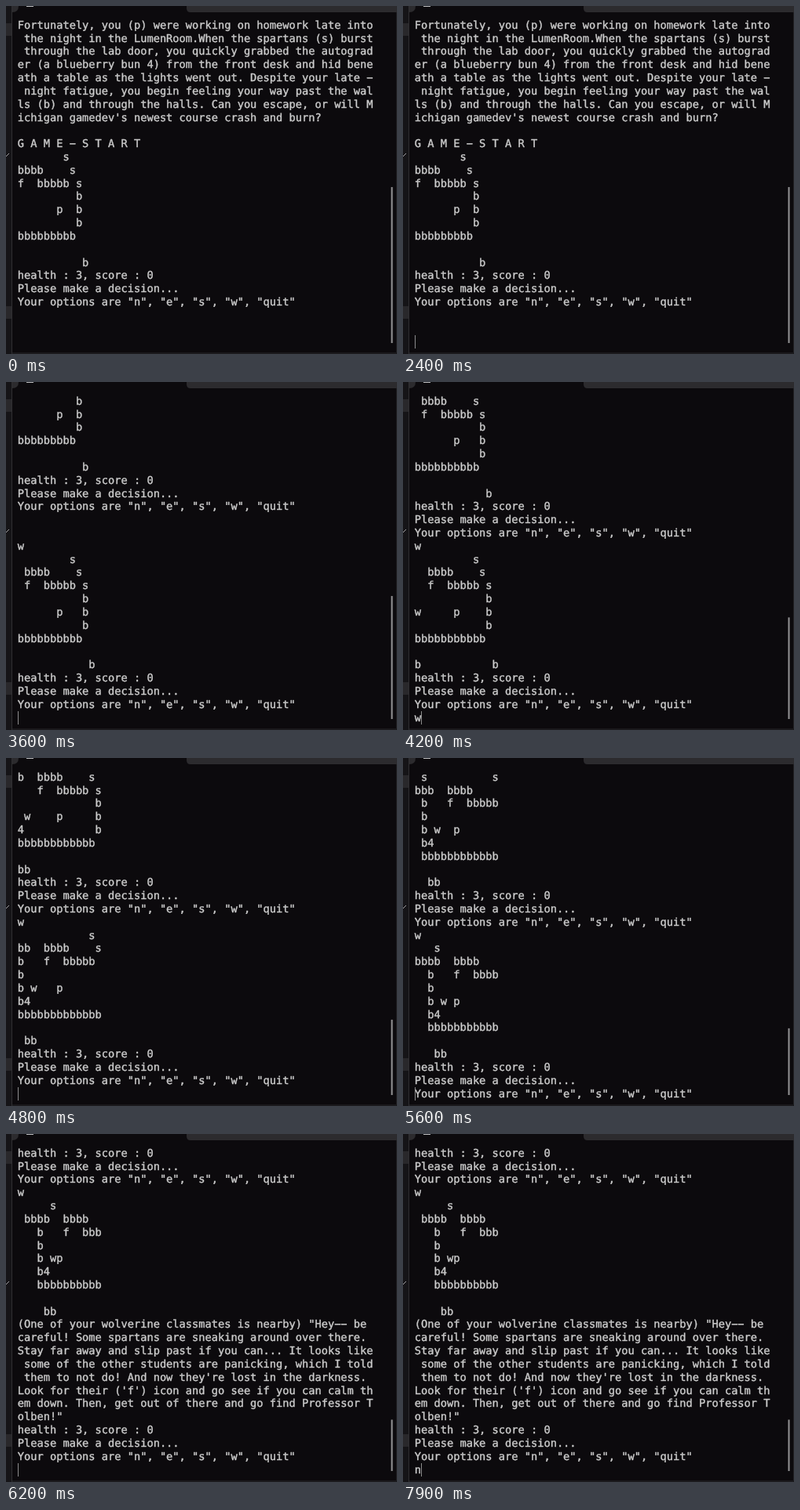
Recreate the animation shown at these times as an HTML page with a canvas. Size 498 px wide and 444 px high, loop 8000 ms.

```html
<!DOCTYPE html>
<html lang="en">
<head>
<meta charset="utf-8">
<title>Terminal maze game</title>
<style>
  html, body { margin: 0; width: 100%; height: 100%; overflow: hidden; background: #0c0a0d; }
  canvas { display: block; }
</style>
</head>
<body>
<canvas id="stage" width="498" height="444"></canvas>
<script>
const ctx = document.getElementById('stage').getContext('2d');
const LOOP = 8000;
const ROWS = 25;
const LEFT = 14.8, BASE = 28.7, LINE = 16.83, CELL = 8.236;

const intro = [
  'Fortunately, you (p) were working on homework late into',
  ' the night in the LumenRoom.When the spartans (s) burst',
  ' through the lab door, you quickly grabbed the autograd',
  'er (a blueberry bun 4) from the front desk and hid bene',
  'ath a table as the lights went out. Despite your late \u2212',
  ' night fatigue, you begin feeling your way past the wal',
  'ls (b) and through the halls. Can you escape, or will M',
  "ichigan gamedev's newest course crash and burn?",
  '',
  'G A M E \u2212 S T A R T'
];
const talk = [
  '(One of your wolverine classmates is nearby) "Hey\u2212\u2212 be',
  'careful! Some spartans are sneaking around over there.',
  'Stay far away and slip past if you can... It looks like',
  ' some of the other students are panicking, which I told',
  " them to not do! And now they're lost in the darkness.",
  "Look for their ('f') icon and go see if you can calm th",
  'em down. Then, get out of there and go find Professor T',
  'olben!"'
];
const status = [
  'health : 3, score : 0',
  'Please make a decision...',
  'Your options are "n", "e", "s", "w", "quit"'
];
const world = [
  '              s',
  ' bbbb  bbbb    s',
  '   b   f  bbbbb s',
  '   b            b',
  '   b w          b',
  '   b4           b',
  '   bbbbbbbbbbbbb',
  '',
  '    bb           b'
];
const VIEW = 13, LAST = 7, PLAYER = 6;

function put(row, col, ch) {
  return row.slice(0, col).padEnd(col) + ch + row.slice(col + 1);
}

// The view slides one column west per turn; one guard walks east.
function mapAt(turn) {
  const from = LAST - turn;
  return world.map((row, i) => {
    let line = row;
    if (i === 0 && turn > 3) line = put(line, turn - 2, 's');
    line = line.slice(from, from + VIEW);
    return i === 4 ? put(line, PLAYER, 'p') : line;
  });
}

const pages = [[...intro, ...mapAt(0), ...status, '', '']];
for (let turn = 1; turn <= LAST; turn++) {
  pages.push([...pages[turn - 1], 'w', ...mapAt(turn),
    ...(turn === LAST ? talk : []), ...status]);
}

// [start, turn, typed, cursor on, output still printing]
const steps = [
  [0, 0, '', 0], [1400, 0, '', 1], [1900, 0, '', 0], [2400, 0, '', 1], [2900, 0, '', 0],
  [3400, 0, 'w', 1], [3600, 1, '', 1],
  [3800, 1, 'w', 1], [4000, 2, '', 1],
  [4200, 2, 'w', 1], [4400, 3, '', 1],
  [4500, 3, 'w', 1], [4800, 4, '', 1],
  [5000, 4, 'w', 1], [5200, 5, '', 1],
  [5500, 5, 'w', 1], [5600, 6, '', 1, true], [5700, 6, '', 1],
  [6100, 6, 'w', 1], [6200, 7, '', 1],
  [6900, 7, '', 0], [7400, 7, '', 1], [7900, 7, 'n', 1]
];

function box(color, x, y, w, h) {
  ctx.fillStyle = color;
  ctx.fillRect(x, y, w, h);
}

function drawFrame() {
  box('#0c0a0d', 0, 0, 498, 444);
  // Window behind, on the left
  box('#151417', 0, 0, 7, 444);
  box('#29282b', 0, 22, 7, 16);
  box('#29282b', 0, 383, 7, 16);
  box('#302f32', 7, 0, 1, 444);
  ctx.strokeStyle = '#a5a5a7';
  ctx.lineWidth = 1;
  ctx.beginPath();
  ctx.moveTo(0, 192);
  ctx.lineTo(4, 188);
  ctx.stroke();
  // Tab bar
  ctx.fillStyle = '#2c2b2e';
  ctx.beginPath();
  ctx.moveTo(230, 0);
  ctx.lineTo(498, 0);
  ctx.lineTo(498, 8);
  ctx.lineTo(235, 8);
  ctx.quadraticCurveTo(230, 8, 230, 3);
  ctx.fill();
  ctx.beginPath();
  ctx.moveTo(8, 0);
  ctx.lineTo(16, 0);
  ctx.quadraticCurveTo(16, 8, 8, 8);
  ctx.fill();
  box('#bdbdbf', 26, 0, 9, 1);
  box('#232225', 497, 8, 1, 436);
  box('#1b1a1d', 8, 442, 490, 2);
}

function drawScrollbar(turn) {
  const total = 48.6 + pages[turn].length - pages[0].length;
  const h = 9670 / total;
  box('#949395', 490.5, 430 - h, 2, h);
}

function drawText(lines) {
  ctx.font = '13.68px "DejaVu Sans Mono", monospace';
  ctx.textRendering = 'geometricPrecision';
  ctx.fillStyle = ctx.strokeStyle = '#cccccc';
  ctx.lineWidth = 0.4;
  ctx.lineJoin = 'round';
  lines.forEach((line, i) => {
    const y = BASE + i * LINE;
    ctx.fillText(line, LEFT, y);
    ctx.strokeText(line, LEFT, y);
  });
}

function draw(time) {
  const [, turn, typed, cursor, printing] = steps.findLast(s => s[0] <= time);
  const lines = printing ? pages[turn] : [...pages[turn], typed];
  drawFrame();
  drawScrollbar(printing ? turn - 1 : turn);
  drawText(lines.slice(-ROWS));
  if (cursor) box('#8c8c8c', Math.round(LEFT + typed.length * CELL), 420, 1, 17);
}

const start = performance.now();
function tick() {
  draw((performance.now() - start) % LOOP);
  requestAnimationFrame(tick);
}
tick();
</script>
</body>
</html>
```
